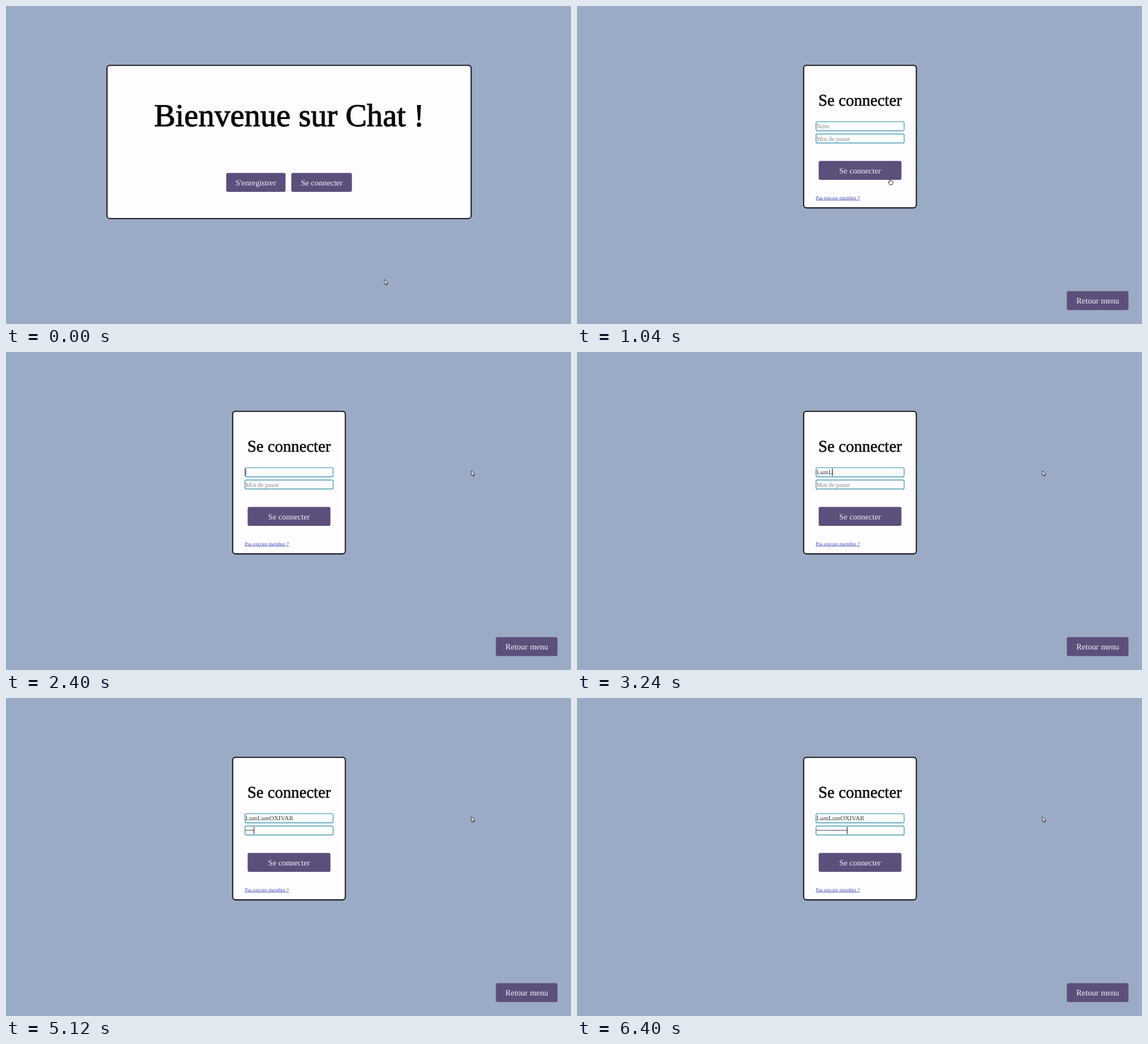
Animation, 800 px wide and 450 px high, one loop 6480 ms. Source, as an HTML page:

```html
<!DOCTYPE html>
<html lang="fr">
<head>
<meta charset="utf-8">
<title>Chat</title>
<style>
  html, body { margin: 0; width: 100%; height: 100%; overflow: hidden; background: #9cabc5; }
  svg { display: block; width: 800px; height: 450px; }
  text { font-family: "Liberation Serif", "Times New Roman", serif; text-rendering: geometricPrecision; white-space: pre; }
  .bg { fill: #9cabc5; }
  .card { fill: #fffdff; stroke: #111116; stroke-width: 1.6; }
  .title { fill: #08080a; stroke: #08080a; text-anchor: middle; }
  .btn rect { fill: #5c4f7b; }
  .btn text { fill: #f6f3fb; font-size: 11.5px; text-anchor: middle; }
  .field { fill: #fdfeff; stroke: #4c9db7; stroke-width: 1.1; }
  .hint { fill: #8b8b8f; font-size: 9px; }
  .value { fill: #38383c; font-size: 9px; }
  .link { fill: #4048b8; font-size: 7.35px; text-decoration: underline; }
  .cursor path { fill: #fff; stroke: #26262c; stroke-width: .8; stroke-linejoin: round; }
  .cursor .beam { fill: none; stroke-width: .9; }
</style>
</head>
<body>
<svg viewBox="0 0 800 450">
  <g id="welcome">
    <rect class="bg" width="800" height="450"/>
    <rect class="card" x="143" y="84" width="515.6" height="216.7" rx="4"/>
    <text class="title" x="401" y="169.5" font-size="45.2" stroke-width=".9">Bienvenue sur Chat !</text>
    <g class="btn">
      <rect x="311.8" y="236.3" width="84" height="26.8" rx="2"/>
      <text x="353.7" y="253.6">S'enregistrer</text>
      <rect x="404" y="236.3" width="85.8" height="26.8" rx="2"/>
      <text x="447" y="253.6">Se connecter</text>
    </g>
  </g>
  <g id="login">
    <rect class="bg" width="800" height="450"/>
    <rect class="card" x="320.9" y="84" width="159.6" height="201.6" rx="4"/>
    <text class="title" x="400.8" y="140.5" font-size="23" stroke-width=".45">Se connecter</text>
    <rect class="field" x="338.4" y="163.8" width="124.8" height="12.8" rx="2"/>
    <rect class="field" x="338.4" y="181.1" width="124.8" height="12.8" rx="2"/>
    <text class="hint" id="nameHint" x="339" y="173.3">Nom</text>
    <text class="hint" id="passHint" x="339" y="190.6">Mot de passe</text>
    <text class="value" x="339" y="173.3"><tspan id="typed"></tspan><tspan id="fresh" opacity=".22"></tspan></text>
    <path id="dots" fill="none" stroke="#26262a" stroke-width="1.6" stroke-linecap="round" stroke-dasharray="0 2.42"/>
    <rect id="caret" width=".9" height="10.4" fill="#222226"/>
    <g class="btn">
      <rect x="342.2" y="219.3" width="117.2" height="26.6" rx="2"/>
      <text x="400.8" y="236.6">Se connecter</text>
      <rect x="693.6" y="403.5" width="87.2" height="26.7" rx="2"/>
      <text x="737.3" y="420.8" style="font-size:11.7px">Retour menu</text>
    </g>
    <text class="link" x="338" y="273.5">Pas encore membre ?</text>
  </g>
  <g class="cursor" id="cursor">
    <path id="arrow" d="M0 0V7l1.6-1.5 1.1 2.6 1.2-.5-1.1-2.5H5z"/>
    <path id="hand" d="M-.7 .8Q0-.2 .7 .8V3.8L3.8 4.4Q4.6 4.7 4.4 5.7L3.6 9.4H-.2L-2.2 6.2Q-2.3 5.2-1.4 5.5L-.7 6.1z"/>
    <path id="beam" class="beam" d="M-1.5-3.7H-.5L0-3.2 .5-3.7H1.5M0-3.2V3.2M-1.5 3.7H-.5L0 3.2 .5 3.7H1.5"/>
  </g>
</svg>
<script>
  const LOOP = 6480, TICK = 40, LOGIN_AT = 1000, CLICK_AT = 1640, TYPE_AT = 2400, PASS_AT = 4320;
  const LEFT = 339, DOT = 2.42, DOT_COUNT = 18;
  const NAME = "LumLumOXIVAR";

  // Typing slows into the first half of the name, then runs evenly.
  const letterTime = i => i < 6 ? TYPE_AT + 960 * (i / 5) ** .6 : 3600 + 112 * (i - 6);
  const dotTime = i => 4740 + 95 * i;

  const home = { x: 536, y: 387 };
  const moves = [
    { from: 360, to: 680, x: 368, y: 251 },
    { from: 680, to: 840, x: 443, y: 243.5 },
    { from: 1080, to: 1640, x: 401, y: 165.2 },
    { from: 1640, to: 2040, x: 659, y: 168 }
  ];

  const $ = id => document.getElementById(id);
  const show = (id, on) => $(id).setAttribute("visibility", on ? "visible" : "hidden");
  const clamp = v => Math.min(1, Math.max(0, v));
  const ease = p => p * p * (3 - 2 * p);

  function typedAt(time, total, t) {
    let n = 0;
    while (n < total && time(n) <= t) n++;
    return n;
  }

  function pointerAt(t) {
    let { x, y } = home;
    for (const m of moves) {
      const e = ease(clamp((t - m.from) / (m.to - m.from)));
      x += (m.x - x) * e;
      y += (m.y - y) * e;
    }
    return [x, y];
  }

  function drawCursor(t) {
    const [x, y] = pointerAt(t);
    const scene = $(t > LOGIN_AT ? "login" : "welcome");
    const over = selector => [...scene.querySelectorAll(selector)].some(el => {
      const b = el.getBBox();
      return x >= b.x && x <= b.x + b.width && y >= b.y && y <= b.y + b.height;
    });
    const kind = over(".btn rect, .link") ? "hand" : over(".field") ? "beam" : "arrow";
    for (const id of ["arrow", "hand", "beam"]) show(id, id === kind);
    $("cursor").setAttribute("transform", `translate(${x} ${y})`);
  }

  function drawForm(t) {
    const all = typedAt(letterTime, NAME.length, t);
    const solid = typedAt(letterTime, NAME.length, t - TICK);
    $("typed").textContent = NAME.slice(0, solid);
    $("fresh").textContent = NAME.slice(solid, all);
    show("nameHint", !all);

    const n = typedAt(dotTime, DOT_COUNT, t);
    show("passHint", !n);
    show("dots", n);
    $("dots").setAttribute("d", `M${LEFT + 1.1} 187.2h${Math.max(n - 1, 0) * DOT + .05}`);

    const inPass = t >= PASS_AT;
    const width = inPass ? n * DOT : solid ? $("typed").getComputedTextLength() : 0;
    $("caret").setAttribute("x", LEFT - .4 + width);
    $("caret").setAttribute("y", inPass ? 182.3 : 165);
    show("caret", (t >= CLICK_AT && t < 2000) || t >= TYPE_AT);
  }

  function draw(now) {
    const t = Math.floor(now % LOOP / TICK) * TICK;
    $("login").setAttribute("opacity", t < LOGIN_AT ? 0 : t < LOGIN_AT + TICK ? .08 : 1);
    drawForm(t);
    drawCursor(t);
  }

  const start = performance.now();
  (function loop() {
    draw(performance.now() - start);
    requestAnimationFrame(loop);
  })();
</script>
</body>
</html>
```
